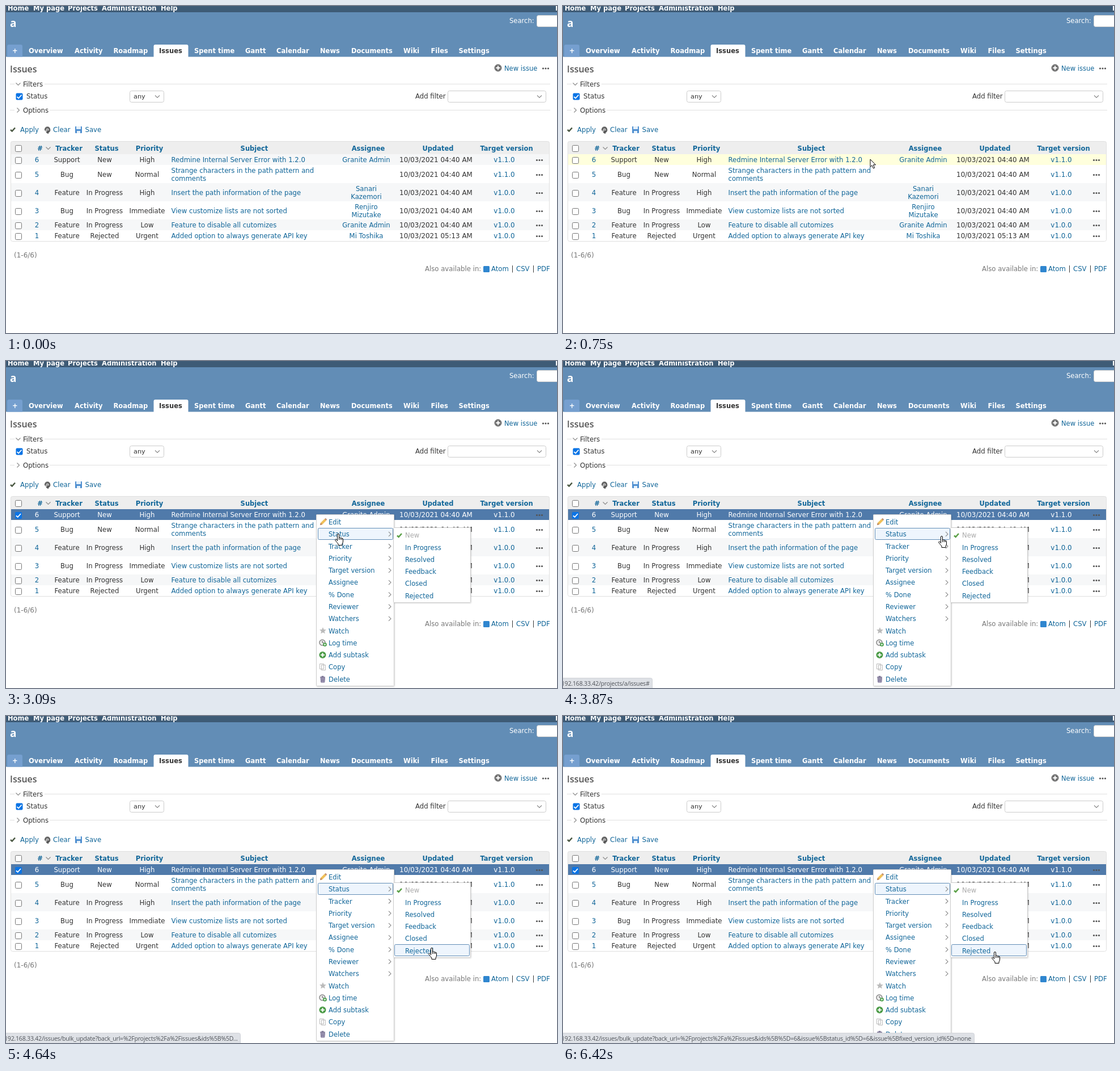
Animation, 972 px wide and 576 px high, one loop 8 s. Source, as an HTML page:

```html
<!DOCTYPE html>
<html lang="en">
<head>
<meta charset="utf-8">
<title>Issues</title>
<style>
  html, body { margin: 0; width: 100%; height: 100%; overflow: hidden; background: #fff; }
  svg { display: block; }
  text { font: 11.7px "DejaVu Sans", sans-serif; fill: #333; }
  .link { fill: #169; }
  .mid { text-anchor: middle; }
  .bold { font-size: 11.5px; font-weight: bold; }
  .white { fill: #fff; }
  .grey { fill: #777; }
  .date { font-size: 11.9px; }
  .item { font-size: 11.55px; }
  .off { fill: #aaa; }
  .line { fill: none; stroke: #e0e0e0; }
  .chev { fill: none; stroke: #888; stroke-width: 1.1; }
  .field { fill: #fff; stroke: #ccc; }
  .pop { fill: #fff; stroke: #ccc; filter: drop-shadow(1px 1px 1px #0002); }
  .hover { fill: #eef5fd; stroke: #628db6; }
  .hover.dead { fill: #eee; stroke: #aaa; }
  .selected text { fill: #fff; }
  .selected .dots { fill: #444; }
  .dots { fill: #555; }
  #bar text { font: 10.6px "Open Sans", sans-serif; letter-spacing: -.24px; fill: #50545a; }
</style>
</head>
<body>
<svg id="stage" width="972" height="576" viewBox="0 0 972 576">
  <defs>
    <path id="down" class="chev" d="M-4-2 0 2 4-2"/>
    <path id="right" class="chev" d="M-2-4 2 0-2 4"/>
    <g id="more" class="dots"><circle cx="-4.5" r="1.6"/><circle r="1.6"/><circle cx="4.5" r="1.6"/></g>
    <path id="tick" fill="none" d="M-4 .5-1.3 3 4-3"/>
    <g id="plus"><circle r="6"/><path d="M-3.5 0h7M0-3.5v7" stroke="#fff" stroke-width="2"/></g>
    <g id="empty"><rect x="-5.5" y="-5.5" width="11" height="11" rx="2" fill="#fff" stroke="#767676"/></g>
    <g id="checked"><rect x="-6" y="-6" width="12" height="12" rx="2" fill="#0b74e5"/><use href="#tick" stroke="#fff" stroke-width="1.8"/></g>
  </defs>

  <g id="page">
    <rect width="972" height="89.500" fill="#628db6"/>
    <rect width="972" height="11" fill="#3e5b76"/>
    <text x="7" y="37" class="white" style="font:700 19px 'Open Sans',sans-serif">a</text>
    <text x="888" y="30" class="white" style="font-size:11.6px">Search:</text>
    <rect x="936.500" y="16.500" width="50" height="20" rx="3" class="field"/>
    <path d="M2 89.500V71q0-3 3-3h21q3 0 3 3v18.500z" fill="#759fcf"/>
    <path d="M260.500 90V71q0-3 3-3h55q3 0 3 3v19z" fill="#fff"/>

    <text x="7" y="117" style="font:600 16px 'Open Sans',sans-serif;fill:#555">Issues</text>
    <use href="#plus" x="868" y="109" fill="#777" stroke="#666"/>
    <text x="879" y="114" class="link" style="font-size:11.5px">New issue</text>
    <use href="#more" x="952" y="110"/>

    <path class="line" d="M7 137.500h8M68 137.500H960M7 183.500h8M77 183.500H960"/>
    <use href="#down" x="21.500" y="137.500"/>
    <text x="30" y="142">Filters</text>
    <use href="#checked" x="23.500" y="159.500"/>
    <text x="36" y="163">Status</text>
    <rect x="218.500" y="149.500" width="60" height="20" rx="3" class="field"/>
    <text x="225" y="163" style="font-size:11.3px">any</text>
    <use href="#down" x="267" y="159.500"/>
    <text x="722" y="163">Add filter</text>
    <rect x="779.500" y="149.500" width="173" height="20" rx="3" class="field"/>
    <use href="#down" x="941" y="159.500"/>
    <use href="#right" x="21.500" y="183.500"/>
    <text x="30" y="188">Options</text>

    <use href="#tick" x="12" y="217.500" stroke="#4d5a45" stroke-width="2.600"/>
    <text x="25" y="222" class="link">Apply</text>
    <circle cx="73" cy="217" r="5" fill="#aaa"/>
    <g fill="none" stroke="#555" stroke-width="2"><path d="M69 219a4.200 4.200 0 1 1 4 3.500M75 219.500l-3 3 3 2"/></g>
    <text x="83" y="222" class="link">Clear</text>
    <rect x="122" y="212" width="12" height="12" rx="1" fill="#4f8fd0"/>
    <path d="M124 212h8v5h-8zM125 220h6v4h-6z" fill="#e5f0fa"/>
    <text x="139.500" y="222" class="link">Save</text>

    <text x="14" y="443" class="grey" style="font-size:12px">(1-6/6)</text>
    <text x="739" y="467" class="grey">Also available in:</text>
    <rect x="842" y="458" width="11" height="11" rx="1.500" fill="#2f86cf"/>
    <text x="856" y="467" class="link">Atom</text>
    <text x="891.500" y="467">|</text>
    <text x="900" y="467" class="link">CSV</text>
    <text x="928.500" y="467">|</text>
    <text x="937" y="467" class="link">PDF</text>
  </g>

  <g id="table">
    <path d="M8.500 261V241q0-2.500 2.500-2.500H956q2.500 0 2.500 2.500v20z" fill="#eee"/>
    <use href="#empty" x="22" y="251"/>
    <use href="#down" x="74.500" y="250.500"/>
  </g>
  <rect x="8.500" y="238.500" width="950" height="176" rx="3" class="line"/>

  <g id="loading" opacity=".5">
    <rect x="495.500" y="198.500" width="264" height="40" fill="#eee" stroke="#bbb"/>
    <circle cx="594" cy="218.500" r="6" fill="none" stroke="#777" stroke-width="2.500" stroke-dasharray="3 1.700"/>
    <text x="639" y="223" class="mid bold">Loading...</text>
  </g>

  <g id="menu">
    <rect x="547.500" y="270.500" width="137" height="302" rx="1" class="pop"/>
    <rect id="menuHover" x="550.500" width="132" height="20" rx="2" class="hover"/>
    <path d="M554 289l1-4 7-7 3 3-7 7z" fill="#efc05a"/><path d="M554 289l1-4 3 3zM562 278l3 3 1-2-2-2z" fill="#b98265"/>
    <path d="M559 469l1.700 4 4.300.300-3.300 2.800 1 4.200-3.700-2.300-3.700 2.300 1-4.200-3.300-2.800 4.300-.300z" fill="#bbb"/>
    <circle cx="558" cy="496" r="5" fill="#eee" stroke="#888" stroke-width="1.500"/>
    <path d="M558 493v3h2.500" fill="none" stroke="#555"/>
    <use href="#plus" transform="translate(562.500 499.500) scale(.55)" fill="#3f9a3f"/>
    <use href="#plus" x="558.500" y="517.700" fill="#4b9b46"/>
    <path d="M553.500 533.500h7v9h-7zM556.500 535.500h7v9h-7z" fill="#fff" stroke="#bbb"/>
    <path d="M554 557h9M556.500 555.500h4" stroke="#7b7394" stroke-width="1.500"/>
    <path d="M555 558.500h7.500l-.700 7.500h-6z" fill="#aaa3c0" stroke="#7b7394"/>
    <path d="M557.500 560v4.500M560 560v4.500" stroke="#665f80"/>
  </g>
  <g id="sub">
    <rect x="683.500" y="293.500" width="136" height="132" rx="1" class="pop"/>
    <rect id="subHover" x="685.500" width="132" height="20" rx="2" class="hover"/>
    <use href="#tick" x="694" y="307" stroke="#5aa046" stroke-width="2.600"/>
  </g>

  <svg id="bar" y="558" height="18">
    <rect id="barBack" x="-5" y=".5" height="24" rx="3" fill="#dee1e6" stroke="#d0d3d8"/>
    <text id="url" x="-3" y="14"></text>
  </svg>

  <g id="cursor" stroke="#000" fill="#fff" stroke-linejoin="round">
    <path id="arrow" d="M.500.500V14l3-2.800 2.500 5.300 2.300-1-2.500-5.200H10z"/>
    <path id="hand" transform="translate(-6)" d="M4.500 13V2q0-1.500 1.500-1.500T7.500 2V7q2.300-.800 2.600.600 2-.500 2.300.700 2.100-.200 2.100 1.700v4q0 2-1.500 4v2.500h-7V18Q4 16 1 12q-.800-1.500.500-2 1.300-.300 3 2zM7.500 7v4M10.100 8v3M12.400 8.500V11"/>
  </g>
</svg>

<script>
const $ = id => document.getElementById(id);
const add = (parent, tag, attrs, content = '') => {
  const e = document.createElementNS('http://www.w3.org/2000/svg', tag);
  for (const k in attrs) e.setAttribute(k, attrs[k]);
  e.textContent = content;
  parent.append(e);
  return e;
};
const text = (parent, x, y, s, cls = '') => add(parent, 'text', { x, y: Math.round(y), class: cls }, s);
const show = (e, on) => e.setAttribute('visibility', on ? 'visible' : 'hidden');

// Navigation
const labels = (list, y) => list.forEach(([s, x, cls = 'white']) => text($('page'), x, y, s, 'bold ' + cls));
labels([['Home', 3], ['My page', 48], ['Projects', 109], ['Administration', 169], ['Help', 273], ['L', 969]], 8);
labels([['+', 11], ['Overview', 40], ['Activity', 121], ['Roadmap', 189.5], ['Issues', 270, ''],
  ['Spent time', 332], ['Gantt', 422], ['Calendar', 477], ['News', 554], ['Documents', 609],
  ['Wiki', 701], ['Files', 749.5], ['Settings', 798.5]], 83);

// Issue table
[['#', 60], ['Tracker', 111], ['Status', 177.5], ['Priority', 253], ['Subject', 438], ['Assignee', 639],
  ['Updated', 762], ['Target version', 883]]
  .forEach(([s, x]) => text($('table'), x, 255, s, 'bold mid link'));

const rows = [
  [261, 19, 'Support', 'New', 'High', 'Redmine Internal Server Error with 1.2.0', 'Granite Admin'],
  [280, 32, 'Bug', 'New', 'Normal', 'Strange characters in the path pattern and|comments', ''],
  [312, 32, 'Feature', 'In Progress', 'High', 'Insert the path information of the page', 'Sanari|Kazemori'],
  [344, 32, 'Bug', 'In Progress', 'Immediate', 'View customize lists are not sorted', 'Renjiro|Mizutake'],
  [376, 19, 'Feature', 'In Progress', 'Low', 'Feature to disable all cutomizes', 'Granite Admin'],
  [395, 19, 'Feature', 'Rejected', 'Urgent', 'Added option to always generate API key', 'Mi Toshika'],
].map(([top, h, tracker, status, priority, subject, person], i) => {
  const g = add($('table'), 'g', {});
  const base = Math.ceil(top + h / 2 + 4.3);
  const cell = (x, s, cls) => s.split('|').forEach((part, n, all) =>
    text(g, x, base + (n - (all.length - 1) / 2) * 14, part, cls));
  const back = add(g, 'rect', { x: 9, y: top, width: 949, height: h });
  const mark = add(g, 'use', { x: 22, y: base - 3 });
  cell(54.5, String(6 - i), 'mid link');
  cell(107.5, tracker, 'mid');
  cell(174, status, 'mid');
  cell(249, priority, 'mid');
  cell(291.5, subject, 'link');
  cell(635.5, person, 'mid link');
  cell(758.5, i < 5 ? '10/03/2021 04:40 AM' : '10/03/2021 05:13 AM', 'mid date');
  cell(879, i < 2 ? 'v1.1.0' : 'v1.0.0', 'mid link date');
  add(g, 'use', { href: '#more', x: 941, y: base - 3.5 });
  return { g, back, mark, top, h, plain: i % 2 ? '#fff' : '#f6f7f8' };
});

// Context menus
const PITCH = 21.28;
['Edit', 'Status', 'Tracker', 'Priority', 'Target version', 'Assignee', '% Done', 'Reviewer', 'Watchers',
  'Watch', 'Log time', 'Add subtask', 'Copy', 'Delete'].forEach((s, i) => {
  const y = 283.7 + i * PITCH;
  text($('menu'), 569, y + 4.3, s, 'item link');
  if (i > 0 && i < 9) add($('menu'), 'use', { href: '#right', x: 677, y });
});
['New', 'In Progress', 'Resolved', 'Feedback', 'Closed', 'Rejected'].forEach((s, i) =>
  text($('sub'), 704, 311.3 + i * PITCH, s, i ? 'item link' : 'item off'));

// Pointer samples: time, x, y
const track = [
  [0, -50, 0], [290, 640, 524], [370, 606, 470], [440, 580, 405], [520, 562, 340], [600, 549, 288],
  [670, 543, 246], [750, 541.5, 269.5], [830, 542, 270], [1220, 545, 270], [1300, 546, 270], [1450, 547, 270],
  [2860, 551, 272], [2930, 563, 284], [3010, 576, 296], [3090, 586, 304],
  [3640, 592, 304], [3720, 612, 305], [3790, 640, 306], [3870, 668, 308], [3940, 695, 313], [4020, 718, 325],
  [4090, 732, 343], [4170, 740, 360], [4250, 737, 376], [4320, 724, 392], [4400, 711, 403],
  [4560, 732, 405], [4640, 751, 408],
  [6120, 753, 409], [6190, 757, 411], [6270, 760, 413], [6340, 761, 414], [6420, 762, 415],
];

const host = '192.168.33.42/';
const update = host + 'issues/bulk_update?back_url=%2Fprojects%2Fa%2Fissues&ids%5B%5D';
const rest = '=6&issue%5Bstatus_id%5D=6&issue%5Bfixed_version_id%5D=none';

function status(t, step) {
  let s = host + 'projects/a/issues#', w = 158;
  if (t >= 4020) {
    s = update + '...';
    w = 414;
  }
  if (t >= 6190) {
    s = update + rest;
    w = 414 + 312 * Math.min(1, (step - 6120) / 300);
  }
  show($('bar'), t >= 3240);
  $('bar').setAttribute('opacity', t < 3320 ? .5 : 1);
  $('bar').setAttribute('width', w);
  $('barBack').setAttribute('width', w + 4.5);
  if ($('url').textContent !== s) $('url').textContent = s;
}

function draw(t) {
  const [step, x, y] = track.findLast(p => p[0] <= t);
  const open = t >= 2080, chosen = t >= 1610;

  rows.forEach((r, i) => {
    const selected = chosen && !i;
    const over = !open && x > 0 && y >= r.top && y < r.top + r.h;
    r.back.setAttribute('fill', selected ? '#507aaa' : over ? '#ffffdd' : r.plain);
    r.g.setAttribute('class', selected ? 'selected' : '');
    r.mark.setAttribute('href', selected ? '#checked' : '#empty');
  });

  const subOpen = t >= 3010;
  const inSub = subOpen && x >= 684;
  const item = inSub ? 1 : Math.floor((y - 273) / PITCH);
  const choice = Math.floor((y - 296.4) / 21.25);
  const onItem = t >= 2930;
  show($('loading'), t >= 2000 && !open);
  show($('menu'), open);
  show($('menuHover'), onItem);
  $('menuHover').setAttribute('y', Math.round(273.7 + item * PITCH) - .5);
  show($('sub'), subOpen);
  show($('subHover'), inSub);
  $('subHover').setAttribute('y', Math.round(297 + choice * PITCH) - .5);
  $('subHover').setAttribute('class', choice ? 'hover' : 'hover dead');

  status(t, step);
  show($('arrow'), !onItem);
  show($('hand'), onItem);
  $('cursor').setAttribute('transform', `translate(${x} ${y})`);
}

const start = performance.now();
function tick() {
  draw((performance.now() - start) % 8000);
  requestAnimationFrame(tick);
}
tick();
</script>
</body>
</html>
```
